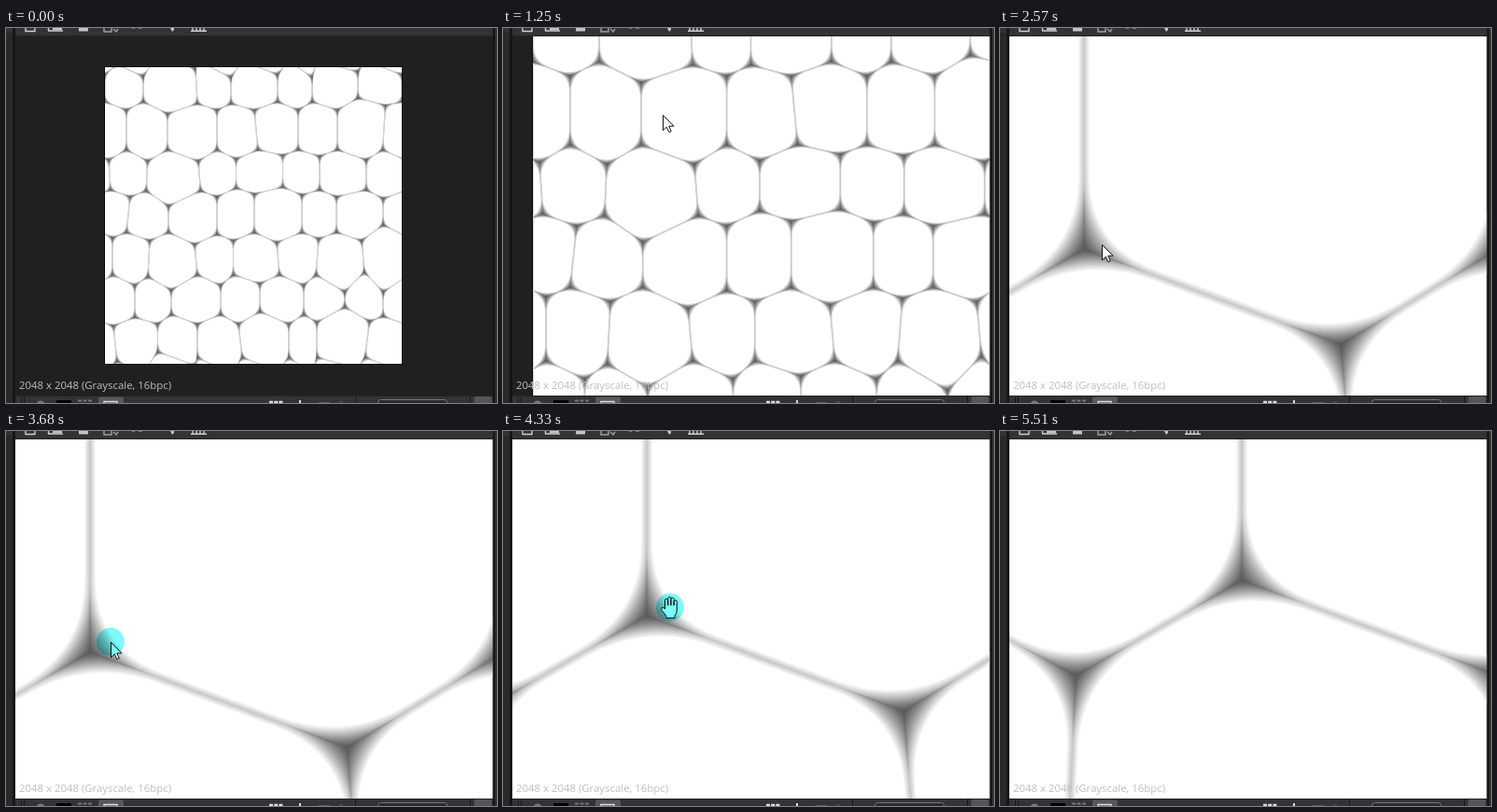
Write an HTML page that moves like this. It is 526 by 402 pixels and loops after 6.47 s.

```html
<!DOCTYPE html>
<html lang="en">
<head>
<meta charset="utf-8">
<title>Cell texture viewer</title>
<style>
  html, body { margin: 0; width: 100%; height: 100%; overflow: hidden; background: #202020; }
  svg { display: block; width: 100vw; height: 100vh; }
  .info { font: 11.4px "Open Sans", "Noto Sans", sans-serif; fill: #bebebe; }
  #press { mix-blend-mode: multiply; }
</style>
</head>
<body>
<svg viewBox="0 0 526 402">
  <defs><clipPath id="port"><rect x="10" y="9" width="511.5" height="385"/></clipPath>
  <clipPath id="sheet"><rect x="106" y="42" width="318" height="318"/></clipPath></defs>

  <rect width="526" height="402" fill="#202020"/>
  <g clip-path="url(#port)">
    <g id="world">
      <rect x="106" y="42" width="318" height="318" fill="#fff" stroke="#000" stroke-width="2" vector-effect="non-scaling-stroke"/>
      <rect x="106" y="42" width="318" height="318" fill="#fff"/>
      <g id="cells" clip-path="url(#sheet)" stroke-linejoin="round"/>
    </g>
  </g>
  <text class="info" x="14" y="387">2048 x 2048 (Grayscale, 16bpc)</text>

  <g id="chrome">
    <path d="M0 0H526V9H0zM0 394H526V402H0z" fill="#333"/>
    <path d="M0 5H7V402H0z" fill="#292929"/>
    <path d="M7 0H10V402H7zM521.5 0H524V402H521.5z" fill="#161616"/>
    <path d="M524 9H526V394H524z" fill="#303030"/>
    <path d="M10 8.5H521M10 394.5H521" stroke="#232323"/>
    <g fill="none" stroke="#d0d0d0" stroke-width="1.4">
      <path d="M21 0V3.5H31V0M45 3H61M45.5 0V3M198 3.2H215M200 0V3M204 0V3M208 0V3M212 0V3"/>
      <path d="M105 0V4H113V0M115 1L118 4L120 1" stroke="#a0a0a0"/>
    </g>
    <path d="M50 0H60V2H50zM78 0H88V3.5H78zM176 0H180V2L178 4z" fill="#c4c4c4"/>
    <path d="M135 0H138V1H135zM142 0H146V1H142z" fill="#777"/>
    <path d="M16.5 396V402M19.5 396V402M374.5 395V402M497.5 395V402" stroke="#151515"/>
    <circle cx="37" cy="404" r="4.5" fill="#777"/>
    <path d="M54 399H70V402H54z" fill="#000"/>
    <path d="M77 399.5H93" stroke="#777" stroke-width="2" stroke-dasharray="4 1.5"/>
    <rect x="99" y="395.5" width="27" height="10" rx="2" fill="#585858"/>
    <path d="M105 402V400.5H119V402" fill="none" stroke="#ddd" stroke-width="1.4"/>
    <path d="M282 401H297" stroke="#ddd" stroke-width="2.5" stroke-dasharray="4 1.2"/>
    <path d="M315 399V402" stroke="#ddd" stroke-width="2"/>
    <path d="M335 401.5H347M357 401H361" stroke="#5a5a5a"/>
    <rect x="398.5" y="398.5" width="74" height="10" rx="3" fill="#2a2a2a" stroke="#777"/>
    <rect x="501.5" y="395" width="19" height="10" rx="2" fill="#555"/>
  </g>

  <path id="arrow" d="M.5 .5V16.8L4.3 13.2L6.8 18.7L9.2 17.7L6.8 12.2H12z" fill="#fff" stroke="#111"/>
  <path id="hand" d="M-5.5 2V-7.5a1.6 1.6 0 0 1 3.2 0V-2V-9.5a1.6 1.6 0 0 1 3.2 0V-2V-8.7a1.6 1.6 0 0 1 3.2 0V-2V-6a1.6 1.6 0 0 1 3.2 0V3Q7.3 7 5 9V11.5H-4V9.5L-9.5 2.5Q-9.5 -.5 -7 .2z" fill="#fff" stroke="#111" stroke-linejoin="round"/>
  <circle id="press" r="15" fill="#7dfafa"/>
</svg>
<script>
const $ = id => document.getElementById(id);
const LOOP = 6470, TILE = 318, N = 7;

// Each row: wall top, wall bottom, then walls as [x, top shift, bottom shift, tilt].
const ROWS = [
  [50, 79, [106], [147, 2], [204, -6, 2, 2], [241, 3, 2], [291], [328, 3], [377, -3, -4]],
  [88, 130.5, [129], [173, 4], [226], [268, 0, 0, 4], [313], [355], [405, -5, 0, -3]],
  [141.5, 173.5, [111, 0, 0, 2], [151, 1.25, 1, -1.5], [207.2, 1.25, 1, 2.5], [246.5, -1, -2], [296.5, -5, -3], [336, -4], [386]],
  [181, 219, [131, 0, 0, -4], [174, 10], [226, 0, 2], [266, -3], [317, -2], [354], [404, 2, -8]],
  [228, 264.5, [114, -3], [153, 0, 2, -2], [203.5, 4, 0, 3], [243.5], [291.5, 2, 0, 3], [333.5, -2, 0, -3], [382.5, 0, -3, 3]],
  [276, 307, [138, 0, 3], [177, 5], [230], [272, -2, -3], [319], [363, 7, -8], [404, 7, 2]],
  [317.5, 353, [117, 2, 4, 4], [162.5, 0, -6], [205], [251, 0, 0, 4], [303], [333, -2], [387, -3, 0, -5]]
];

const mod = n => (n + N) % N;
function wall(r, i) {
  const [top, bottom, ...walls] = ROWS[mod(r)];
  const [x, up = 0, down = 0, tilt = 0] = walls[mod(i)];
  const ox = TILE * Math.floor(i / N), oy = TILE * Math.floor(r / N);
  return {
    top: [x + ox - tilt / 2, top + up + oy],
    bottom: [x + ox + tilt / 2, bottom + down + oy]
  };
}

// Joints of the cell net, each with its three neighbours.
const joints = [];
for (let r = -1; r < N; r++) {
  const shift = ROWS[mod(r)][2][0] < ROWS[mod(r + 1)][2][0] ? 0 : 1;
  for (let i = -1; i <= N; i++) {
    const up = k => wall(r, k).bottom, low = k => wall(r + 1, k).top;
    joints.push([up(i), wall(r, i).top, low(i - 1 + shift), low(i + shift)]);
    joints.push([low(i), wall(r + 1, i).bottom, up(i - shift), up(i + 1 - shift)]);
  }
}

const pt = p => p.map(v => v.toFixed(2)).join(" ");
function wedge([p, ...ends], reach) {
  const tips = ends.map(e => {
    const dx = e[0] - p[0], dy = e[1] - p[1], len = Math.hypot(dx, dy) || 1;
    const k = Math.min(reach, len) / len;
    return [p[0] + dx * k, p[1] + dy * k];
  });
  return `M${pt(tips[0])}` + [1, 2, 0].map(k => `Q${pt(p)} ${pt(tips[k])}`).join("") + "Z";
}

// Nested level shapes, painted from light to dark.
const LEVELS = 30, DARK = 0.66, LINE = 0.23;
const lines = joints.map(([p, ...ends]) => ends.map(e => `M${pt(p)}L${pt(e)}`).join("")).join("");
let layers = "";
for (let k = 0; k < LEVELS; k++) {
  const d = DARK * (k + 0.5) / LEVELS, thin = d < LINE;
  const reach = thin ? 9.6 - d * 2 : 9.1 * Math.pow(1 - (d - LINE) / (DARK - LINE), 0.8);
  const g = Math.round(255 * (1 - d)), tone = `rgb(${g},${g},${g})`;
  const shape = joints.map(j => wedge(j, reach)).join("") + (thin ? lines : "");
  const stroke = thin ? ` stroke="${tone}" stroke-width="${(1.6 * (1 - d / LINE)).toFixed(3)}"` : "";
  layers += `<path d="${shape}" fill="${tone}"${stroke}/>`;
}
$("cells").innerHTML = layers;

const clamp = v => Math.max(0, Math.min(1, v));
const mix = (a, b, p) => a + (b - a) * p;
const mix2 = (a, b, p) => [mix(a[0], b[0], p), mix(a[1], b[1], p)];
const easeIn = p => p * p, easeOut = p => p * (2 - p), linear = p => p;

// Fraction done of a move that advances in n equal jumps.
const jumps = (t, from, to, n) => clamp((Math.floor((t - from) / (to - from) * (n - 1)) + 1) / n);

function track(keys, t) {
  for (let i = 1; i < keys.length; i++) {
    const [t0, a] = keys[i - 1], [t1, b, ease] = keys[i];
    if (t < t1) return mix2(a, b, ease(clamp((t - t0) / (t1 - t0))));
  }
  return keys[keys.length - 1][1];
}

const ANCHOR = [173, 130.5];
const HOME = [171, 93], NEAR = [109, 232], GRAB = [112, 226], DROP = [284, 151];
const ZOOMS = [990, 1120, 1250, 1330, 1410, 1780, 1845, 1910];
const DRAG_VIEW = [[3680, [90, 237]], [4330, [154, 198], easeIn], [4730, [226, 170], linear], [5150, [259, 160], easeOut]];
const DRAG_HAND = [[3680, GRAB], [4330, [179, 189], easeIn], [4730, [250, 161], linear], [5150, DROP, easeOut]];
const dragTime = t => 4330 + Math.floor((t - 4330) / 40) * 40;

function view(t) {
  if (t >= 3680) return { s: 8.36, at: track(DRAG_VIEW, dragTime(t)) };
  const n = ZOOMS.filter(z => z <= t).length;
  const s = Math.pow(1.2, n);
  if (n <= 3) return { s, at: mix2(ANCHOR, [148, 125], (s - 1) / 0.728) };
  const at = [HOME[0] - 13.3 * s, HOME[1] + 18.5 * s];
  if (t < 2070) return { s, at };
  const z = s * Math.pow(8.36 / s, jumps(t, 2070, 2570, 13));
  return { s: z, at: mix2(at, [90, 237], (z - s) / (8.36 - s)) };
}

function pointer(t) {
  if (t < 270 || t >= 5510) return null;
  if (t < 990) return mix2([383, 1], HOME, easeOut(clamp(Math.floor((t - 270) / 43.75) / 8)));
  if (t < 3160) return mix2(HOME, NEAR, jumps(t, 2070, 2570, 13));
  if (t < 3420) return mix2(NEAR, [111, 226], jumps(t, 3160, 3240, 3));
  if (t < 3680) return GRAB;
  if (t < 5310) return track(DRAG_HAND, dragTime(t));
  return mix2(DROP, [347, 6], easeIn(Math.floor((t - 5310) / 50) / 3));
}

function place(el, pos) {
  el.style.display = pos ? "" : "none";
  if (pos) el.setAttribute("transform", `translate(${pos[0].toFixed(2)} ${pos[1].toFixed(2)})`);
}

function draw(t) {
  const { s, at } = view(t), pos = pointer(t);
  const x = at[0] - ANCHOR[0] * s, y = at[1] - ANCHOR[1] * s;
  $("world").setAttribute("transform", `translate(${x.toFixed(3)} ${y.toFixed(3)}) scale(${s.toFixed(4)})`);
  const pressed = t >= 3680 && t < 5310, grabbing = pressed && t >= 3700;
  place($("press"), pressed && pos);
  place($("hand"), grabbing && pos);
  place($("arrow"), !grabbing && pos);
}

const start = performance.now();
function tick() {
  draw((performance.now() - start) % LOOP);
  requestAnimationFrame(tick);
}
draw(0);
requestAnimationFrame(tick);
</script>
</body>
</html>
```
